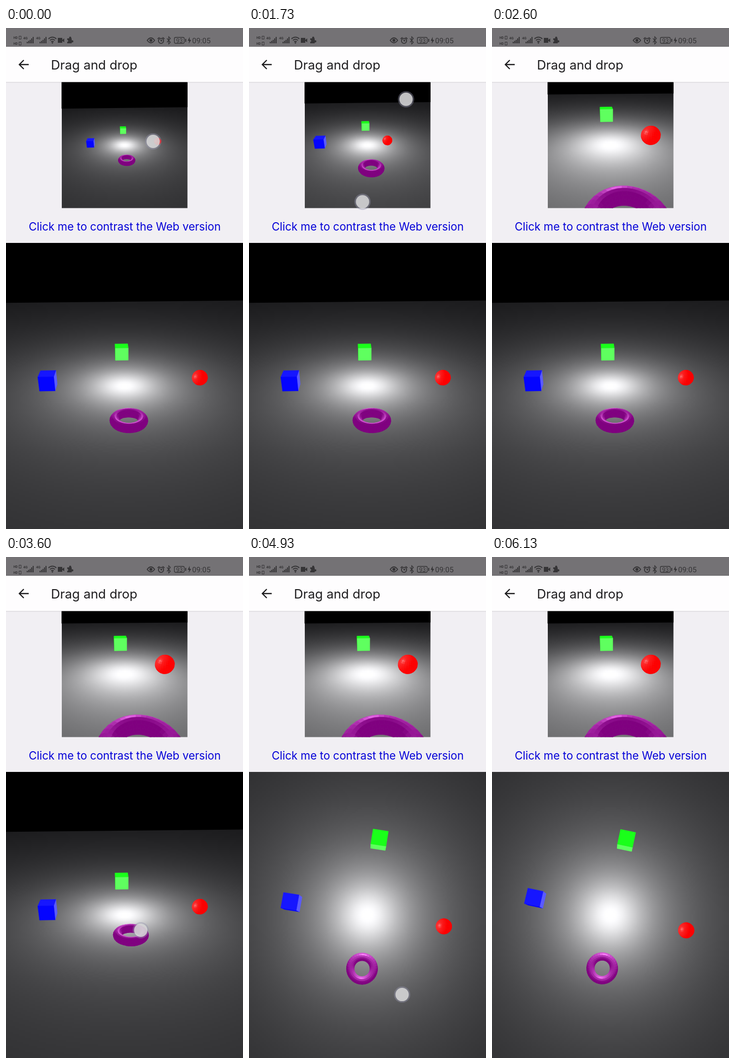
Recreate the animation shown at these times as an HTML page with a canvas. Size 480x1014 px, loop 6.19 s.

```html
<!DOCTYPE html>
<html lang="en">
<head>
<meta charset="utf-8">
<title>Drag and drop</title>
<style>
  html, body { margin: 0; width: 480px; height: 1014px; overflow: hidden; background: #f1eff3; }
  svg, canvas { position: absolute; left: 0; top: 0; }
  text { font-family: Inter, sans-serif; }
  .status text { font-family: Roboto, sans-serif; fill: #353436; }
</style>
</head>
<body>
<svg width="480" height="1014">
  <rect y="108" width="480" height="3" fill="#e2e0e4"/>
  <rect y="38" width="480" height="71" fill="#fefdfe"/>
  <rect width="480" height="38" fill="#747275"/>
  <g class="status" fill="#353436" stroke="#353436" stroke-width="0">
    <g font-size="6.5" font-weight="700">
      <text x="15" y="22">HD</text><text x="15" y="34">HD</text>
      <text x="35" y="23" font-size="7">4G</text><text x="61" y="23" font-size="7">4G</text>
    </g>
    <g fill="none" stroke-width="1">
      <rect x="26.5" y="16.5" width="4" height="6"/><rect x="26.5" y="28.5" width="4" height="6"/>
    </g>
    <path id="bars" d="M42 31v-3h2v3zM45 31v-5h2v5zM48 31v-7h2v7zM51 31v-10h2v10zM54 31v-13h2v13z"/>
    <use href="#bars" x="26"/>
    <g fill="none" stroke-width="1.8">
      <path d="M86 22q8-7 16 0M89 25q5-4.500 10 0M91.500 28q2.500-2 5 0"/>
      <path d="M286 25q7.500-10 15 0q-7.500 10-15 0z"/>
      <circle cx="314" cy="26" r="5.200"/>
      <path d="M314 23v3h2.500M307 22l4-3M321 22l-4-3"/>
      <path d="M326 21l7 8-3.500 3.500v-15l3.500 3.500-7 8" stroke-width="1.300"/>
      <rect x="341" y="19" width="20" height="12" rx="2.500" stroke-width="1.300"/>
    </g>
    <circle cx="94" cy="30" r="1.500"/>
    <circle cx="293.500" cy="25" r="3"/>
    <path d="M105 20h9v10h-9zM114 24l4-3v8l-4-3z"/>
    <path d="M124 21h4a2.300 2.300 0 1 1 4 0h1v4a2.300 2.300 0 1 1 0 4v2h-9v-3a2 2 0 1 0 0-4z"/>
    <path d="M363 22h2v6h-2zM372 18l-4 8h3l-1 6 5-8h-3z"/>
    <text x="344.500" y="29.500" font-size="12">93</text>
    <text x="377" y="31" font-size="15">09:05</text>
  </g>
  <path d="M46 74H27M36 65l-9 9 9 9" fill="none" stroke="#1d1c1e" stroke-width="2.400"/>
  <text x="91" y="84" font-size="25.800" fill="#1d1c1e">Drag and drop</text>
  <text x="46" y="410" font-size="22.400" fill="#0502d8">Click me to contrast the Web version</text>
</svg>
<canvas id="stage" width="480" height="1014"></canvas>
<script>
const LOOP = 6190, STEP = LOOP / 93, CELL = 4, FAR_EDGE = -25;
const LIGHT = [0, 2, 0];
const ctx = document.getElementById('stage').getContext('2d');
const floorCanvas = document.createElement('canvas');
const floorCtx = floorCanvas.getContext('2d');

const sub = (a, b) => a.map((v, i) => v - b[i]);
const add = (a, b) => a.map((v, i) => v + b[i]);
const dot = (a, b) => a[0] * b[0] + a[1] * b[1] + a[2] * b[2];
const unit = a => { const l = Math.hypot(...a); return a.map(v => v / l); };
const mix = (a, b, k) => a + (b - a) * k;
const smooth = (t, from, to) => {
  const u = Math.min(1, Math.max(0, (t - from) / (to - from)));
  return u * u * (3 - 2 * u);
};

// Surface of revolution: a torus, or a sphere when ring is 0.
function ringMesh(ring, tube, around, across, b0, b1) {
  const point = (i, j) => {
    const a = i / around * 2 * Math.PI, b = mix(b0, b1, j / across), c = Math.cos(b);
    const normal = [c * Math.cos(a), Math.sin(b), c * Math.sin(a)], r = ring + tube * c;
    return { normal, pos: [r * Math.cos(a), tube * Math.sin(b), r * Math.sin(a)] };
  };
  const faces = [];
  for (let i = 0; i < around; i++) for (let j = 0; j < across; j++) faces.push({
    normal: point(i + .5, j + .5).normal,
    points: [[0, 0], [1, 0], [1, 1], [0, 1]].map(([u, v]) => point(i + u, j + v).pos)
  });
  return faces;
}

function cubeMesh() {
  const faces = [];
  for (let axis = 0; axis < 3; axis++) for (const side of [-1, 1]) {
    const normal = [0, 0, 0];
    normal[axis] = side;
    const points = [[-1, -1], [1, -1], [1, 1], [-1, 1]].map(([u, v]) => {
      const p = [0, 0, 0];
      p[axis] = side / 2; p[(axis + 1) % 3] = u / 2; p[(axis + 2) % 3] = v / 2;
      return p;
    });
    faces.push({ normal, points });
  }
  return faces;
}

const cube = cubeMesh();
const sphere = ringMesh(0, .5, 28, 18, -Math.PI / 2, Math.PI / 2);
const torus = ringMesh(.75, .25, 36, 16, 0, 2 * Math.PI);

function makeCamera(view, yaw, pitch, dist) {
  const rad = Math.PI / 180, sy = Math.sin(yaw * rad), cy = Math.cos(yaw * rad);
  const sp = Math.sin(pitch * rad), cp = Math.cos(pitch * rad);
  const focal = view.h / 2 / Math.tan(23 * rad);
  const midX = view.x + view.w / 2, midY = view.y + view.h / 2;
  return {
    sp, cp, dist, focal,
    eye: [0, dist * sp, dist * cp],
    turn: ([x, y, z]) => [x * cy - z * sy, y, x * sy + z * cy],
    project([x, y, z]) {
      const k = focal / (dist - z * cp - y * sp);
      return [midX + x * k, midY + (z * sp - y * cp) * k];
    }
  };
}

function drawFloor(view, cam) {
  const w = Math.ceil(view.w / CELL), h = Math.ceil(view.h / CELL);
  floorCanvas.width = w;
  floorCanvas.height = h;
  const image = floorCtx.createImageData(w, h);
  for (let j = 0, i = 0; j < h; j++) {
    const v = ((j + .5) * CELL - view.h / 2) / cam.focal;
    const slope = cam.sp + v * cam.cp;
    const z = v * cam.dist / slope, depth = cam.dist - z * cam.cp;
    for (let k = 0; k < w; k++, i += 4) {
      const x = ((k + .5) * CELL - view.w / 2) / cam.focal * depth;
      const shade = slope > 0 ? 248 * 2 / Math.sqrt(4 + x * x + z * z) + 11 : 0;
      image.data[i] = image.data[i + 1] = shade;
      image.data[i + 2] = shade + 2;
      image.data[i + 3] = 255;
    }
  }
  floorCtx.putImageData(image, 0, 0);
  ctx.drawImage(floorCanvas, view.x, view.y, w * CELL, h * CELL);

  const [a, b] = [-40, 40].map(x => cam.project(cam.turn([x, 0, FAR_EDGE])));
  ctx.fillStyle = '#000';
  ctx.beginPath();
  ctx.moveTo(...a);
  ctx.lineTo(...b);
  ctx.lineTo(b[0], -9999);
  ctx.lineTo(a[0], -9999);
  ctx.fill();
}

function drawObject(cam, { mesh, pos, color, diffuse, shine }) {
  const faces = [];
  for (const face of mesh) {
    const points = face.points.map(p => cam.turn(add(p, pos)));
    const normal = cam.turn(face.normal);
    const mid = points.reduce(add).map(v => v / 4);
    const toEye = sub(cam.eye, mid);
    if (dot(normal, toEye) <= 0) continue;
    const light = unit(sub(LIGHT, mid)), half = unit(add(light, unit(toEye)));
    const lit = diffuse * Math.max(0, dot(normal, light))
      + shine * Math.max(0, dot(normal, half)) ** 40;
    faces.push({ points, lit, far: dot(toEye, toEye) });
  }
  faces.sort((a, b) => b.far - a.far);
  for (const { points, lit } of faces) {
    ctx.fillStyle = ctx.strokeStyle = `rgb(${color.map(c => Math.min(255, Math.round(c + lit)))})`;
    ctx.lineWidth = .6;
    ctx.beginPath();
    points.forEach(p => ctx.lineTo(...cam.project(p)));
    ctx.closePath();
    ctx.fill();
    ctx.stroke();
  }
}

function drawView(view, cam, redX, torusPos) {
  const matte = { mesh: cube, diffuse: 92, shine: 0 };
  const objects = [
    { ...matte, pos: [0, .5, -5], color: [8, 255, 8] },
    { ...matte, pos: [-5, .5, 0], color: [4, 4, 255] },
    { mesh: sphere, pos: [redX, .5, 0], color: [255, 0, 0], diffuse: 45, shine: 80 },
    { mesh: torus, pos: torusPos, color: [128, 0, 128], diffuse: 90, shine: 60 }
  ];
  ctx.save();
  ctx.beginPath();
  ctx.rect(view.x, view.y, view.w, view.h);
  ctx.clip();
  drawFloor(view, cam);
  objects.forEach(o => drawObject(cam, o));
  ctx.restore();
}

function drawTouch(x, y) {
  for (const [r, fill] of [[16.5, 'rgba(150,150,175,.4)'], [13.5, 'rgba(216,216,216,.85)']]) {
    ctx.fillStyle = fill;
    ctx.beginPath();
    ctx.arc(x, y, r, 0, 2 * Math.PI);
    ctx.fill();
  }
}

const topView = { x: 112.5, y: 109.5, w: 255, h: 255 };
const mainView = { x: 0, y: 435, w: 480, h: 579 };

function draw(t) {
  ctx.clearRect(0, 0, 480, 1014);

  const zoom = smooth(t, 1370, 2330), dist = 22.36 * (8 / 22.36) ** zoom;
  const topCam = makeCamera(topView, mix(-3, -4, zoom), mix(26.57, 25, zoom), dist);
  const redX = mix(5, 2.15, smooth(t, 0, 900));
  drawView(topView, topCam, redX, [0, .5, 5]);

  const orbit = smooth(t, 4450, 4930);
  const yaw = mix(-2.6, 9, orbit) + 3 * smooth(t, 4930, 5350);
  const mainCam = makeCamera(mainView, yaw, mix(26.57, 85, orbit), 22.36);
  const drag = smooth(t, 2900, 3550);
  const torusPos = [.2 * drag, .5, mix(5, 3.5, drag)];
  drawView(mainView, mainCam, 5, torusPos);

  if (t < 1000) {
    const [x, y] = topCam.project(topCam.turn([redX, .5, 0]));
    drawTouch(x - 9, y);
  } else if (t > 1350 && t < 2330) {
    const spread = 15.8 / dist;
    drawTouch(274 + 45 * spread, 248 - 106 * spread);
    drawTouch(274 - 45 * spread, 248 + 106 * spread);
  } else if (t > 2850 && t < 4050) {
    const [x, y] = mainCam.project(mainCam.turn(torusPos));
    drawTouch(x + 20, y - 9);
  } else if (t > 4330 && t < 5250) {
    const slide = smooth(t, 4330, 4960);
    drawTouch(mix(319, 310, slide) - 5 * smooth(t, 4930, 5250), mix(840, 886, slide));
  }
}

function tick(now) {
  draw(Math.floor((now % LOOP + 4) / STEP) * STEP);
  requestAnimationFrame(tick);
}
requestAnimationFrame(tick);
</script>
</body>
</html>
```
